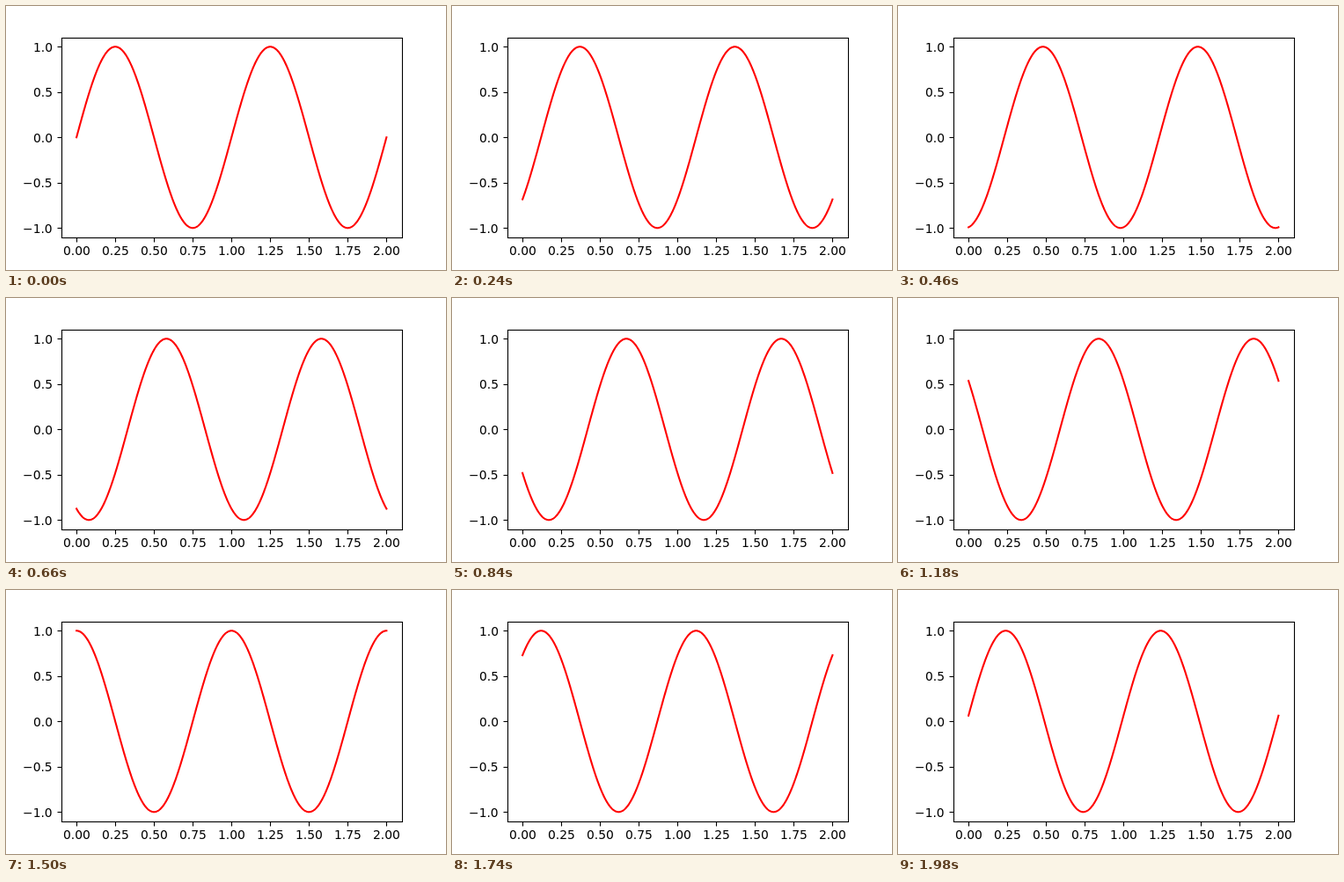
Write an HTML page with a canvas that moves like this. It is 500x300 px and loops after 2000 ms.

```html
<!DOCTYPE html>
<html lang="en">
<head>
<meta charset="utf-8">
<title>Travelling sine wave</title>
<style>
  html, body { margin: 0; width: 100%; height: 100%; overflow: hidden; background: #fff; }
  canvas { display: block; }
</style>
</head>
<body>
<canvas id="plot" width="500" height="300"></canvas>
<script>
const ctx = document.getElementById("plot").getContext("2d");

const PT = 100 / 72;                                  // pixels per point
const BOX = { left: 62.5, top: 36, right: 450, bottom: 262.5 };
const UNIT_X = (BOX.right - BOX.left) / 2.2;
const UNIT_Y = (BOX.bottom - BOX.top) / 2.2;
const LOOP = 2000, STEP = 20, STEPS = LOOP / STEP;
const SAMPLES = 1000;

const toX = x => BOX.left + (x + 0.1) * UNIT_X;
const toY = y => BOX.bottom - (y + 1.1) * UNIT_Y;
const snap = v => Math.floor(v + 0.5) + 0.5;

function segment(x1, y1, x2, y2) {
  ctx.beginPath();
  ctx.moveTo(x1, y1);
  ctx.lineTo(x2, y2);
  ctx.stroke();
}

function drawAxes() {
  const left = snap(BOX.left), right = snap(BOX.right);
  const top = snap(BOX.top), bottom = snap(BOX.bottom);

  ctx.strokeStyle = ctx.fillStyle = "#000";
  ctx.lineWidth = 0.8 * PT;
  ctx.lineCap = "butt";
  ctx.lineJoin = "miter";
  ctx.font = `${10 * PT}px "DejaVu Sans", sans-serif`;
  ctx.textAlign = "left";
  ctx.textBaseline = "alphabetic";

  for (let i = 0; i <= 8; i++) {
    const x = toX(i / 4), label = (i / 4).toFixed(2);
    segment(snap(x), bottom, snap(x), bottom + 5);
    ctx.fillText(label, Math.round(x - ctx.measureText(label).width / 2), 283);
  }

  for (let i = -2; i <= 2; i++) {
    const y = toY(i / 2);
    const label = (i < 0 ? "\u2212" : "") + Math.abs(i / 2).toFixed(1);
    segment(left, snap(y), left - 5, snap(y));
    const end = BOX.left - 7 * PT;
    ctx.fillText(label, Math.round(end - ctx.measureText(label).width), Math.round(y + 5.3));
  }

  ctx.strokeRect(left, top, right - left, bottom - top);
}

function drawWave(shift) {
  ctx.strokeStyle = "#f00";
  ctx.lineWidth = 1.5 * PT;
  ctx.lineCap = "square";
  ctx.lineJoin = "round";
  ctx.beginPath();
  for (let i = 0; i < SAMPLES; i++) {
    const x = 2 * i / (SAMPLES - 1);
    ctx.lineTo(toX(x), toY(Math.sin(2 * Math.PI * (x - shift))));
  }
  ctx.stroke();
}

function draw(time) {
  const step = Math.floor((time % LOOP) / STEP);
  ctx.fillStyle = "#fff";
  ctx.fillRect(0, 0, 500, 300);
  drawWave(step / STEPS);
  drawAxes();
}

const start = performance.now();
function tick() {
  draw(performance.now() - start);
  requestAnimationFrame(tick);
}
tick();
</script>
</body>
</html>
```
